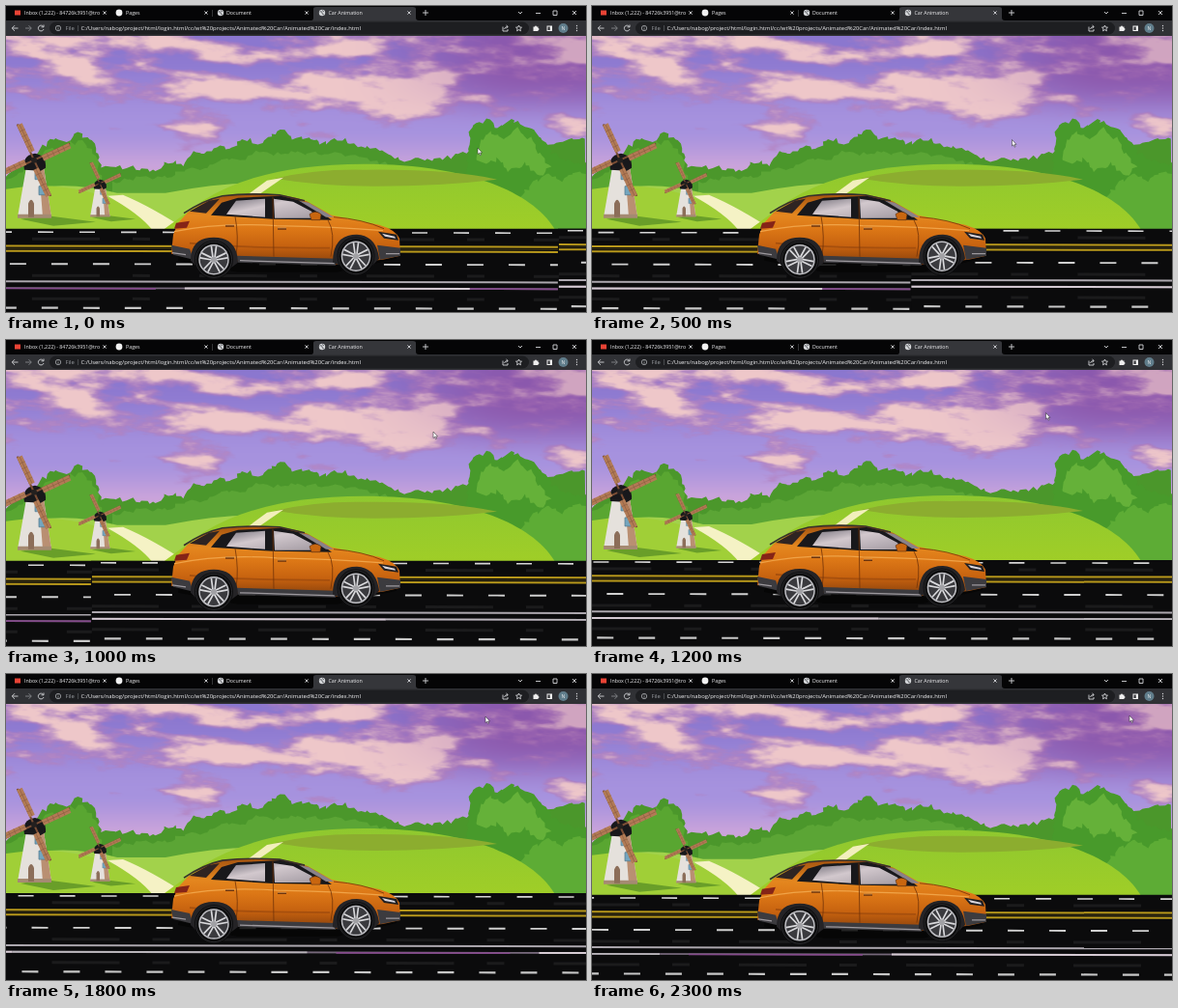
Recreate the animation shown at these times as an HTML page with a canvas. Size 600 by 317 pixels, loop 2400 ms.

```html
<!DOCTYPE html>
<html lang="en">
<head>
<meta charset="utf-8">
<title>Car Animation</title>
<style>
  html, body { margin: 0; width: 100%; height: 100%; overflow: hidden; background: #000; }
  #page { position: absolute; left: 0; top: 31px; width: 600px; height: 286px; overflow: hidden; }
  #world { position: absolute; left: 0; top: -31px; width: 600px; height: 325px; }
  canvas, svg { position: absolute; left: 0; top: 0; display: block; }
  text { font-family: "Open Sans", "Noto Sans", sans-serif; fill: #f1f1f3; }
  .tab { font-size: 5.3px; }
  .url { font-size: 5.9px; }
  .line { fill: none; stroke: #d4d5d8; stroke-width: .9; }
</style>
</head>
<body>
<div id="page"><div id="world">
<canvas id="sky" width="600" height="190"></canvas>
<svg width="600" height="325" viewBox="0 0 600 325">
  <defs>
    <linearGradient id="paint" x1="0" y1="0" x2="0" y2="1">
      <stop offset="0" stop-color="#a3520f"/><stop offset=".3" stop-color="#e4871f"/>
      <stop offset=".5" stop-color="#dc7716"/><stop offset=".75" stop-color="#c5610f"/>
      <stop offset="1" stop-color="#87400c"/>
    </linearGradient>
    <linearGradient id="glass" x1="0" y1="0" x2="1" y2="1">
      <stop offset="0" stop-color="#77737d"/><stop offset=".4" stop-color="#d2c8cd"/>
      <stop offset="1" stop-color="#a39ba3"/>
    </linearGradient>
    <linearGradient id="hill" x1="0" y1="0" x2="0" y2="1">
      <stop offset="0" stop-color="#8fc82f"/><stop offset="1" stop-color="#a0ce27"/>
    </linearGradient>
    <g id="sail">
      <path d="M0 0V-41" stroke="#7c4e35" stroke-width="2"/>
      <path d="M-1-9H5V-40H-1Z" fill="#b27b55"/>
      <path d="M-1-15H5M-1-21H5M-1-27H5M-1-33H5M2-9V-40" stroke="#8c5c42" stroke-width=".6"/>
    </g>
    <g id="mill">
      <path d="M-14 61L10 57 64 64 20 68Z" fill="#578e24" opacity=".75"/>
      <path d="M-8 7H10L18 59H-17Z" fill="#e5e1dc"/>
      <path d="M5 7H10L18 59H9Z" fill="#b98f72"/>
      <path d="M-17 56L18 56 18 60H-17Z" fill="#a58a72"/>
      <path d="M-10 10Q-13-5 1-7 13-5 12 8L7 11Z" fill="#18181b"/>
      <path d="M1 13h6v7H1ZM5 27h7v9H5Z" fill="#74a5bd" stroke="#50768c" stroke-width=".7"/>
      <path d="M-6 45Q-3 37 0 45V59H-6Z" fill="#8c6e59"/>
      <g transform="rotate(-25)">
        <use href="#sail"/><use href="#sail" transform="rotate(90)"/>
        <use href="#sail" transform="rotate(180)"/><use href="#sail" transform="rotate(270)"/>
      </g>
      <circle r="3" fill="#24201f"/>
    </g>
    <g id="spokes" stroke="#d9d9dc" stroke-width="1.7">
      <path id="spoke" d="M-1-2L-2.6-14M1-2L2.6-14"/>
      <use href="#spoke" transform="rotate(72)"/><use href="#spoke" transform="rotate(144)"/>
      <use href="#spoke" transform="rotate(216)"/><use href="#spoke" transform="rotate(288)"/>
    </g>
    <g id="tire">
      <circle r="20" fill="#0d0d0e"/><circle r="18.6" fill="none" stroke="#29292c"/>
      <circle r="15" fill="#3a3a3e" stroke="#bfbfc4" stroke-width="1.5"/>
    </g>
    <g id="tile" transform="rotate(.12 0 232)" fill="none">
      <path d="M0 231H1237V345H0Z" fill="#0b0b0c"/>
      <path d="M0 240H1237M0 278H1237M0 302H1237" stroke="#1b1b1c" stroke-width="3" stroke-dasharray="70 34 18 51"/>
      <path d="M10 233H1236" stroke="#d5d5d5" stroke-width="1.6" stroke-dasharray="16 27"/>
      <path d="M0 247.4H1236M0 252.6H1236" stroke="#b9991b" stroke-width="2"/>
      <path d="M0 250H1236" stroke="#3c3310" stroke-width="1.2"/>
      <path d="M24 266H1236" stroke="#d0d0d0" stroke-width="1.9" stroke-dasharray="17 26"/>
      <path d="M0 284.2H1236" stroke="#aca7ae" stroke-width="2"/>
      <path d="M0 291H1236" stroke="#75677a" stroke-width="1.8"/>
      <path d="M0 291H305M850 291H1145" stroke="#d6cbd4" stroke-width="2"/>
      <path d="M305 291H610" stroke="#b9b5ba" stroke-width="1.8"/>
      <path d="M640 291.4H820M1145 291H1236" stroke="#854b8c" stroke-width="1.7"/>
      <path d="M14 311.5H1236" stroke="#c8c8c8" stroke-width="2.2" stroke-dasharray="17 26"/>
    </g>
  </defs>

  <!-- countryside -->
  <path class="leaf" fill="#4b972b" data-edge="0,177 15,165 38,146 50,137 62,139 75,131 92,143 99,167 130,168 153,171 168,162 184,164 192,152 206,152 217,146 232,148 246,137 263,143 276,133 288,128 297,140 312,135 326,143 350,137 360,144 382,148 398,155 412,160 440,160 466,155 480,150 500,150 600,137" data-base="600,240 0,240"/>
  <path class="leaf" fill="#59a631" data-edge="0,180 20,172 42,150 55,148 67,142 81,141 92,154 98,178" data-base="98,200 0,200"/>
  <path class="leaf" fill="#5ba535" data-edge="110,182 140,178 160,179 180,171 205,169 224,158 244,160 258,151 278,154 294,151 316,153 338,153 365,157 395,165" data-base="395,200 110,200"/>
  <path class="leaf" fill="#489a2b" data-edge="476,186 477,153 481,128 498,118 509,126 524,118 540,125 554,136 565,153 580,161 600,164" data-base="600,240 560,240"/>
  <path class="leaf" fill="#65b139" data-edge="487,160 491,141 500,129 514,137 529,128 542,138 552,154 564,169 551,177 535,163 521,172 508,158 498,166" data-base="487,160"/>
  <path class="leaf" fill="#5dac35" data-edge="530,200 545,184 562,174 577,183 588,171 600,176" data-base="600,240 545,240"/>
  <path d="M0 194Q60 179 115 194L165 194Q225 182 275 184V236H0Z" fill="#a2d24b"/>
  <path d="M0 190Q60 180 113 202Q145 216 170 234H0Z" fill="#a0cf37"/>
  <path d="M105 197L121 196Q150 208 188 233H152Q139 216 105 197Z" fill="#f5f2c5"/>
  <path d="M205 201Q265 164 370 164C470 164 545 190 569 234H160Z" fill="url(#hill)"/>
  <path d="M278 179Q322 169 370 170 460 169 508 180 450 187 382 187 325 187 278 179Z" fill="#8cad2f"/>
  <path d="M247 198L270 181 287 178 261 196Z" fill="#f2efbc"/>
  <use href="#mill" transform="translate(29 160)"/>
  <use href="#mill" transform="translate(97 184) scale(.58)"/>

  <!-- road -->
  <path d="M0 231H600V325H0Z" fill="#0b0b0c"/>
  <g id="road"><use href="#tile"/><use href="#tile" x="-1236"/><use href="#tile" x="1236"/></g>

  <!-- car -->
  <path d="M178 264L240 276 342 276 404 262 400 254H180Z" fill="#050505" opacity=".85"/>
  <path d="M171 257L173 237 178 225 188 214 208 202Q222 196 250 195 290 194 312 203L337 217 386 227Q403 232 407 241L408 259 390 263 342 268 240 265 192 260Z" fill="url(#paint)"/>
  <path d="M184 215Q205 201 224 197 250 194 283 196L309 202" fill="none" stroke="#37302c" stroke-width="1.6"/>
  <path d="M212 217L223 204 240 199 284 197 305 202 330 217 337 222 276 221Z" fill="#18181b"/>
  <path d="M228 216L238 202 268 200V219ZM277 200L297 203 316 213 321 220H278Z" fill="url(#glass)"/>
  <path d="M190 213L210 202 221 200 207 215Z" fill="#2f2422"/>
  <path d="M303 202L313 204 339 219 331 219Z" fill="#88818a"/>
  <path d="M314 216Q320 211 326 216L325 222 316 222Z" fill="#c9660f" stroke="#552b12" stroke-width=".6"/>
  <path d="M174 234Q220 224 280 228 340 229 390 233" fill="none" stroke="#f0a347" stroke-width="1.2"/>
  <path d="M190 246Q240 251 335 251" fill="none" stroke="#a64f0d" stroke-width="1.8"/>
  <path d="M237 218Q241 240 238 259M276 198L277 260M333 222Q341 235 336 260M339 219Q369 221 391 231" fill="none" stroke="#713308" stroke-width=".8"/>
  <path d="M227 228h9M281 231h9" stroke="#6c320b" stroke-width="2"/>
  <path d="M227 227.2h9M281 230.2h9" stroke="#efb064" stroke-width=".7"/>
  <path d="M176 225L190 223 187 230 174 231Z" fill="#852417"/>
  <path d="M385 234L404 237 406 243 391 241Z" fill="#211f22"/>
  <path d="M389 236L402 239 403 241 392 239Z" fill="#d8d5dc"/>
  <path d="M171 248L190 252 194 263 173 258ZM238 259L341 262V269L240 266ZM384 248L408 251 408 259 387 263Z" fill="#3c3b3f"/>
  <path d="M242 264L340 267M393 257L407 257M172 256L186 258" stroke="#9c989d" stroke-width="1.3"/>
  <path d="M191 264Q191 240 215 240 239 240 240 266L232 272H199ZM338 266Q338 237 363 237 383 238 386 262L379 269H346Z" fill="#242326"/>
  <g transform="translate(215 263)"><use href="#tire"/><g class="wheel"><use href="#spokes"/></g><circle r="3" fill="#a1a1a5"/></g>
  <g transform="translate(362 259.5) scale(.97 1)"><use href="#tire"/><g class="wheel"><use href="#spokes"/></g><circle r="3" fill="#a1a1a5"/></g>
</svg>
</div></div>

<svg width="600" height="317" viewBox="0 0 600 317">
  <defs>
    <g id="globe">
      <circle r="3.2" fill="#d5d7da"/>
      <path d="M-2.5-1Q0-2 0 0T2 2M0-2.6L2-1" fill="none" stroke="#4b4d52" stroke-width=".8"/>
    </g>
    <path id="x" class="line" d="M-1.6-1.6L1.6 1.6M1.6-1.6L-1.6 1.6"/>
  </defs>
  <path d="M0 0H600V15H0Z" fill="#050506"/>
  <path d="M0 15H600V31H0Z" fill="#303135"/>
  <path d="M316 15Q318 15 318 12V3Q318 1 321 1H421Q424 1 424 3V12Q424 15 427 15Z" fill="#35363a"/>
  <rect x="45" y="16.5" width="496" height="13" rx="6.5" fill="#1d1e21"/>
  <rect x="9" y="4.5" width="6" height="5" fill="#ea4335"/>
  <circle cx="117" cy="7" r="3.4" fill="#f2f2f2"/>
  <use href="#globe" x="222" y="7"/><use href="#globe" x="327" y="7"/>
  <g class="tab">
    <text x="19" y="9">Inbox (1,222) - 84726k3951@tro</text>
    <text x="124" y="9">Pages</text>
    <text x="228" y="9">Document</text>
    <text x="333.5" y="9">Car Animation</text>
  </g>
  <path d="M213.500 4V11" stroke="#55565a" stroke-width=".6"/>
  <use href="#x" x="102" y="7"/><use href="#x" x="207" y="7"/><use href="#x" x="311" y="7"/><use href="#x" x="417" y="7"/>
  <path class="line" d="M431 7H437M434 4V10M530 6L532 8 534 6M548 7.500H553M566 5H570V9.500H566ZM586 5L590 9M590 5L586 9"/>
  <path class="line" d="M12.500 23H6.500M9 20.200L6.200 23 9 25.800"/>
  <path class="line" d="M20 23H26M23.500 20.200L26.300 23 23.500 25.800" style="stroke:#85878b"/>
  <path class="line" d="M38.600 21.300A2.900 2.900 0 1 0 39 24M39 19.500V21.800H36.500"/>
  <circle class="line" cx="54" cy="23" r="2.7" style="stroke:#9a9ca0"/>
  <path d="M54 22.500V24.800M54 21V21.700" stroke="#9a9ca0" stroke-width=".8"/>
  <text class="url" x="61.500" y="25" style="fill:#96989d">File</text>
  <path d="M74.500 20V26" stroke="#66686c" stroke-width=".6"/>
  <text class="url" x="77.500" y="25">C:/Users/nabog/project/html/login.html/cc/wt%20projects/Animated%20Car/Animated%20Car/index.html</text>
  <path class="line" d="M514 21.500V26H519V24M515.500 24Q516 21.500 519 21.500M517.500 20L519.300 21.500 517.500 23"/>
  <path class="line" d="M530.500 20L531.400 22 533.500 22.200 531.900 23.600 532.400 25.800 530.500 24.600 528.600 25.800 529.100 23.600 527.500 22.200 529.600 22Z"/>
  <path d="M545.500 21.500H547A1 1 0 0 1 549 21.500H550.500V23A1 1 0 0 1 550.500 25V26H545.500Z" fill="#eee"/>
  <path d="M559.500 20.500H565V26H559.500Z" fill="#f3f3f3"/><path d="M560.500 21.500H562.700V25H560.500Z" fill="#303135"/>
  <circle cx="576.500" cy="23" r="5" fill="#607d8b"/>
  <text x="576.500" y="24.800" font-size="5" text-anchor="middle">N</text>
  <g fill="#d4d5d8"><circle cx="590.500" cy="20.500" r=".7"/><circle cx="590.500" cy="23" r=".7"/><circle cx="590.500" cy="25.500" r=".7"/></g>
  <path id="cursor" d="M0 0V6.500L1.500 5.200 2.600 7.700 3.600 7.200 2.500 4.900H4.500Z" fill="#fff" stroke="#222" stroke-width=".5"/>
</svg>

<script>
const $ = id => document.getElementById(id);

const hash = (x, y) => {
  let h = (Math.imul(x, 374761393) + Math.imul(y, 668265263)) | 0;
  h = Math.imul(h ^ (h >>> 13), 1274126177);
  return ((h ^ (h >>> 16)) >>> 0) / 2 ** 32;
};
const mix = (a, b, k) => a + (b - a) * k;
const blend = (a, b, k) => a.map((v, i) => mix(v, b[i], k));
const smooth = (a, b, v) => {
  const k = Math.min(1, Math.max(0, (v - a) / (b - a)));
  return k * k * (3 - 2 * k);
};

function noise(x, y) {
  const i = Math.floor(x), j = Math.floor(y);
  const u = smooth(0, 1, x - i), v = smooth(0, 1, y - j);
  return mix(mix(hash(i, j), hash(i + 1, j), u), mix(hash(i, j + 1), hash(i + 1, j + 1), u), v);
}
function fbm(x, y) {
  let sum = 0, amp = .5;
  for (let n = 0; n < 5; n++, amp *= .52, x = x * 2 + 17, y = y * 2 + 9) sum += amp * noise(x, y);
  return sum;
}

// Cloud banks: x, y, half width, half height, strength
const banks = [
  [70, 82, 130, 22, .2], [175, 92, 70, 18, .15], [270, 50, 100, 16, .14],
  [360, 85, 80, 24, .2], [470, 92, 80, 18, .12], [550, 112, 60, 10, .15],
  [150, 128, 75, 9, .1], [500, 45, 90, 16, .08],
  [180, 47, 45, 9, -.16], [30, 117, 70, 13, -.18], [255, 116, 65, 14, -.2], [430, 128, 75, 12, -.16]
];

function paintSky() {
  const ctx = $('sky').getContext('2d');
  const img = ctx.createImageData(600, 190);
  const blue = [139, 119, 207], lilac = [166, 146, 222], rose = [207, 166, 218];
  const cream = [238, 199, 201], mauve = [178, 127, 189], plum = [139, 80, 164];
  for (let y = 25; y < 190; y++) for (let x = 0; x < 600; x++) {
    const slant = y - x * .12;
    const d = banks.reduce((s, [cx, cy, w, h, k]) =>
      s + k * Math.exp(-(((x - cx) / w) ** 2) - ((y - cy) / h) ** 2),
      fbm(x / 58 + slant / 70, slant / 19)) - smooth(118, 150, y) * .22;
    let c = blend(blend(blue, lilac, smooth(40, 125, y)), rose, smooth(125, 178, y));
    const dusk = smooth(330, 540, x) * (1 - smooth(70, 130, y));
    c = blend(c, plum, dusk * .8);
    c = blend(c, blend(mauve, plum, dusk * .5), smooth(.44, .58, d) * .75);
    c = blend(c, cream, smooth(.53, .74, d) * (1 - dusk * .35));
    img.data.set([...c, 255], (y * 600 + x) * 4);
  }
  ctx.putImageData(img, 0, 0);
}

// Break each edge into small leafy steps.
function leafy(path, seed) {
  const pts = path.dataset.edge.split(' ').map(p => p.split(',').map(Number));
  let d = 'M' + pts[0];
  for (let i = 1; i < pts.length; i++) {
    const [x0, y0] = pts[i - 1], [x1, y1] = pts[i];
    const n = Math.ceil(Math.hypot(x1 - x0, y1 - y0) / 4);
    for (let k = 1; k <= n; k++) {
      const dx = (hash(i * 31 + k, seed) - .5) * 4, dy = (hash(k, seed + i * 17) - .5) * 5;
      d += `L${(mix(x0, x1, k / n) + dx).toFixed(1)} ${(mix(y0, y1, k / n) + dy).toFixed(1)}`;
    }
  }
  path.setAttribute('d', d + 'L' + path.dataset.base + 'Z');
}

// Pointer: time, x, y
const track = [
  [0, 488, 147], [300, 422, 202], [700, 447, 75], [1000, 442, 95],
  [1400, 497, 56], [1800, 496, 44], [2300, 556, 43], [2400, 556, 43]
];
function pointer(t) {
  const i = track.findIndex(p => p[0] > t);
  const [a, b] = [track[i - 1], track[i]];
  const k = (t - a[0]) / (b[0] - a[0]);
  return [mix(a[1], b[1], k), mix(a[2], b[2], k)];
}

const wheels = document.querySelectorAll('.wheel');
function draw(ms) {
  const t = Math.floor((ms % 2400) / 100) * 100;
  const lift = -2 * (1 - Math.cos(2 * Math.PI * (t - 250) / 2800));
  $('world').style.transform = `translateY(${lift.toFixed(2)}px)`;
  $('road').setAttribute('transform', `translate(${571 - .483 * t} 0)`);
  wheels.forEach(w => w.setAttribute('transform', `rotate(${t * .36})`));
  $('cursor').setAttribute('transform', `translate(${pointer(t)})`);
}

paintSky();
document.querySelectorAll('.leaf').forEach((p, i) => leafy(p, i * 7 + 3));
draw(0);
let start;
requestAnimationFrame(function tick(now) {
  start ??= now;
  draw(now - start);
  requestAnimationFrame(tick);
});
</script>
</body>
</html>
```
